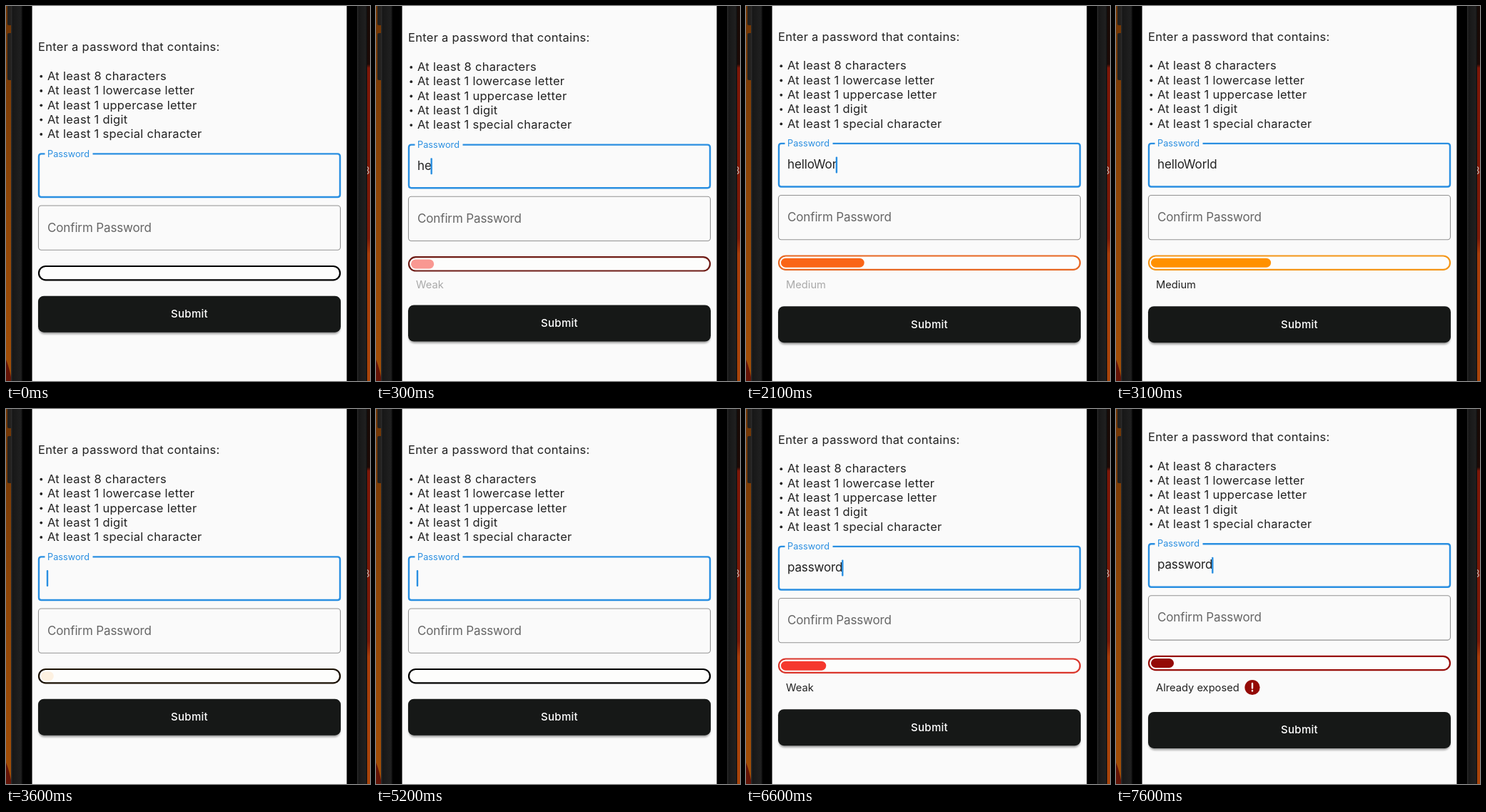
Animation of 510x526 px, one loop 8 s. Source, as an HTML page:

```html
<!DOCTYPE html>
<html lang="en">
<head>
<meta charset="utf-8">
<title>Password strength</title>
<style>
  html, body { margin: 0; width: 100%; height: 100%; overflow: hidden; background: #000; }
  svg { display: block; width: 100%; height: 100%; }
  text { font-family: Inter, Roboto, sans-serif; font-size: 17px; letter-spacing: -0.14px; fill: #222; white-space: pre; }
  #rules text { font-size: 16.5px; letter-spacing: 0.29px; }
  .status text { font-size: 14.7px; letter-spacing: 0; }
</style>
</head>
<body>
<svg viewBox="0 0 510 526">
  <defs>
    <linearGradient id="left" x2="0" y2="1">
      <stop offset="0" stop-color="#713605"/>
      <stop offset=".5" stop-color="#8f4607"/>
      <stop offset="1" stop-color="#a34e06"/>
    </linearGradient>
    <linearGradient id="right" x2="0" y2="1">
      <stop offset="0" stop-color="#170b07"/>
      <stop offset=".155" stop-color="#1c0a06"/>
      <stop offset=".165" stop-color="#7c1607"/>
      <stop offset=".62" stop-color="#7a1a08"/>
      <stop offset=".66" stop-color="#a63c0a"/>
      <stop offset="1" stop-color="#a8440a"/>
    </linearGradient>
    <linearGradient id="edge">
      <stop offset="0" stop-color="#303030"/>
      <stop offset=".15" stop-color="#171717"/>
      <stop offset=".85" stop-color="#202020"/>
      <stop offset="1" stop-color="#0c0c0c"/>
    </linearGradient>
    <filter id="soft" x="-5%" y="-20%" width="110%" height="150%">
      <feGaussianBlur stdDeviation="1.4"/>
    </filter>
  </defs>

  <!-- desktop and phone body -->
  <rect width="12" height="526" fill="url(#left)"/>
  <path d="M0 496Q5 508 8 526H0Z" fill="#641407"/>
  <rect x="500" width="10" height="526" fill="url(#right)"/>
  <text x="501" y="236" style="font-size:14px;fill:#c9bab5">8</text>
  <rect x="2" y="-10" width="8" height="37" rx="2" fill="#242220"/>
  <rect x="2" y="38" width="8" height="66" rx="2" fill="#242220"/>
  <rect x="7" width="499" height="526" fill="#000"/>
  <rect x="7" width="16" height="526" fill="url(#edge)"/>
  <rect x="492" width="14" height="526" fill="url(#edge)"/>
  <rect x="36.6" width="440.8" height="526" fill="#fafafa"/>

  <g id="status" class="status"></g>

  <g id="upper">
    <g id="rules"></g>
    <path d="M121.5 207.4H464.5Q468 207.4 468 211V264.5Q468 268 464.5 268H49.5Q46 268 46 264.5V211Q46 207.4 49.5 207.4H54.5"
          fill="none" stroke="#2a8fe1" stroke-width="2.4"/>
    <text x="58" y="211.5" style="font-size:12.75px;letter-spacing:0;fill:#2a8fe1">Password</text>
    <text id="typed" x="58" y="242.5"></text>
    <rect id="cursor" y="226" width="2.4" height="23" rx="1" fill="#2a8fe1"/>
    <rect x="45.5" y="280" width="423" height="62.3" rx="4" fill="none" stroke="#929292" stroke-width="1.1"/>
    <text x="58" y="316.7" style="fill:#666">Confirm Password</text>
    <rect id="track" x="46" y="365" width="422" height="19.3" rx="9.65" fill="#fdfdfc" stroke-width="2.2"/>
    <rect id="fill" x="49" y="368.2" height="13" rx="6.5"/>
  </g>

  <g id="lower">
    <rect x="46" y="409" width="422" height="51" rx="8" fill="#000" opacity=".4" filter="url(#soft)"/>
    <rect x="45" y="406.7" width="424" height="51" rx="8" fill="#161817"/>
    <text x="257" y="437.3" text-anchor="middle" style="font-size:15px;font-weight:500;letter-spacing:.3px;fill:#fff">Submit</text>
  </g>
</svg>

<script>
const LOOP = 8000, FADE = 500, SLIDE = 320, BAR = 416;
const $ = id => document.getElementById(id);

const LEVELS = {
  empty:   { shift: 0,    part: 0,    line: [0, 0, 0],      fill: null },
  weak:    { shift: 14.5, part: .152, line: [218, 54, 44],  fill: [245, 56, 46],  label: 'Weak' },
  medium:  { shift: 14.5, part: .404, line: [244, 150, 24], fill: [255, 145, 0],  label: 'Medium' },
  exposed: { shift: 18.2, part: .077, line: [152, 14, 10],  fill: [148, 10, 6],   label: 'Already exposed' }
};

// [time, text in the field]
const KEYS = [
  [-800, ''], [90, 'h'], [290, 'he'], [490, 'hel'], [690, 'hell'], [890, 'hello'],
  [1390, 'helloW'], [1690, 'helloWo'], [1890, 'helloWor'], [2190, 'helloWorl'], [2390, 'helloWorld'],
  [3190, ''],
  [5390, 'p'], [5490, 'pa'], [5690, 'pas'], [5890, 'pass'],
  [5990, 'passw'], [6190, 'passwo'], [6290, 'passwor'], [6490, 'password']
];

// [time, strength level]
const STEPS = [
  [-1000, 'empty'], [90, 'weak'], [1890, 'medium'], [3190, 'empty'], [5390, 'weak'], [6640, 'exposed']
];

const clamp = x => Math.min(1, Math.max(0, x));
const ease = (x, power) => 1 - (1 - clamp(x)) ** power;
const mix = (a, b, p) => a + (b - a) * p;
const rgb = (a, b, p) => `rgb(${a.map((v, i) => Math.round(mix(v, b[i], p)))})`;
const lastIndex = (list, t) => list.findLastIndex(item => item[0] <= t);

['Enter a password that contains:', '', 'At least 8 characters', 'At least 1 lowercase letter',
 'At least 1 uppercase letter', 'At least 1 digit', 'At least 1 special character'
].forEach((line, i) => {
  const y = 63.3 + i * 20.3;
  $('rules').innerHTML += i < 2
    ? `<text x="45" y="${y}">${line}</text>`
    : `<circle cx="49.3" cy="${y - 5.2}" r="1.9" fill="#222"/><text x="58" y="${y}">${line}</text>`;
});

const ICON = `<circle cx="191" cy="390.5" r="10.6" fill="#940a06"/>
  <path d="M191 385V391.5M191 395V395.4" stroke="#fff" stroke-width="2.4" stroke-linecap="round"/>`;

for (const [name, level] of Object.entries(LEVELS)) {
  if (level.label) $('status').innerHTML +=
    `<g id="${name}"><text x="56" y="395.7">${level.label}</text>${name === 'exposed' ? ICON : ''}</g>`;
}

function cursorAlpha(age) {
  if (age < 500) return 1;
  const a = (age - 500) % 1000;
  return a < 320 ? 1 - clamp(a / 200) : clamp((a - 340) / 140);
}

function drawField(t) {
  const [start, text] = KEYS[lastIndex(KEYS, t)];
  $('typed').textContent = text;
  const width = text ? $('typed').getComputedTextLength() : 0;
  $('cursor').setAttribute('x', 56.8 + width);
  $('cursor').setAttribute('opacity', cursorAlpha(t - start));
}

function drawStrength(t) {
  const i = lastIndex(STEPS, t);
  const [start, name] = STEPS[i];
  const before = STEPS[Math.max(0, i - 1)][1];
  const from = LEVELS[before], to = LEVELS[name];
  const p = ease((t - start) / FADE, 1.3);
  const shift = mix(from.shift, to.shift, ease((t - start) / SLIDE, 2));

  $('upper').setAttribute('transform', `translate(0 ${-shift})`);
  $('lower').setAttribute('transform', `translate(0 ${shift})`);
  $('track').setAttribute('stroke', rgb(from.line, to.line, p));

  const a = from.fill || to.fill, b = to.fill || from.fill;
  const bar = $('fill');
  bar.setAttribute('width', Math.max(13, BAR * mix(from.part, to.part, p)));
  bar.setAttribute('fill', a ? rgb(a, b, p) : 'none');
  bar.setAttribute('opacity', mix(+!!from.fill, +!!to.fill, p));

  for (const key of ['weak', 'medium', 'exposed']) {
    const alpha = key === name ? clamp((t - start - 100) / 300)
      : key === before ? 1 - clamp((t - start) / 200) : 0;
    $(key).setAttribute('opacity', alpha);
  }
}

const begin = performance.now();
function frame() {
  const t = (performance.now() - begin) % LOOP;
  drawField(t);
  drawStrength(t);
  requestAnimationFrame(frame);
}
frame();
</script>
</body>
</html>
```
